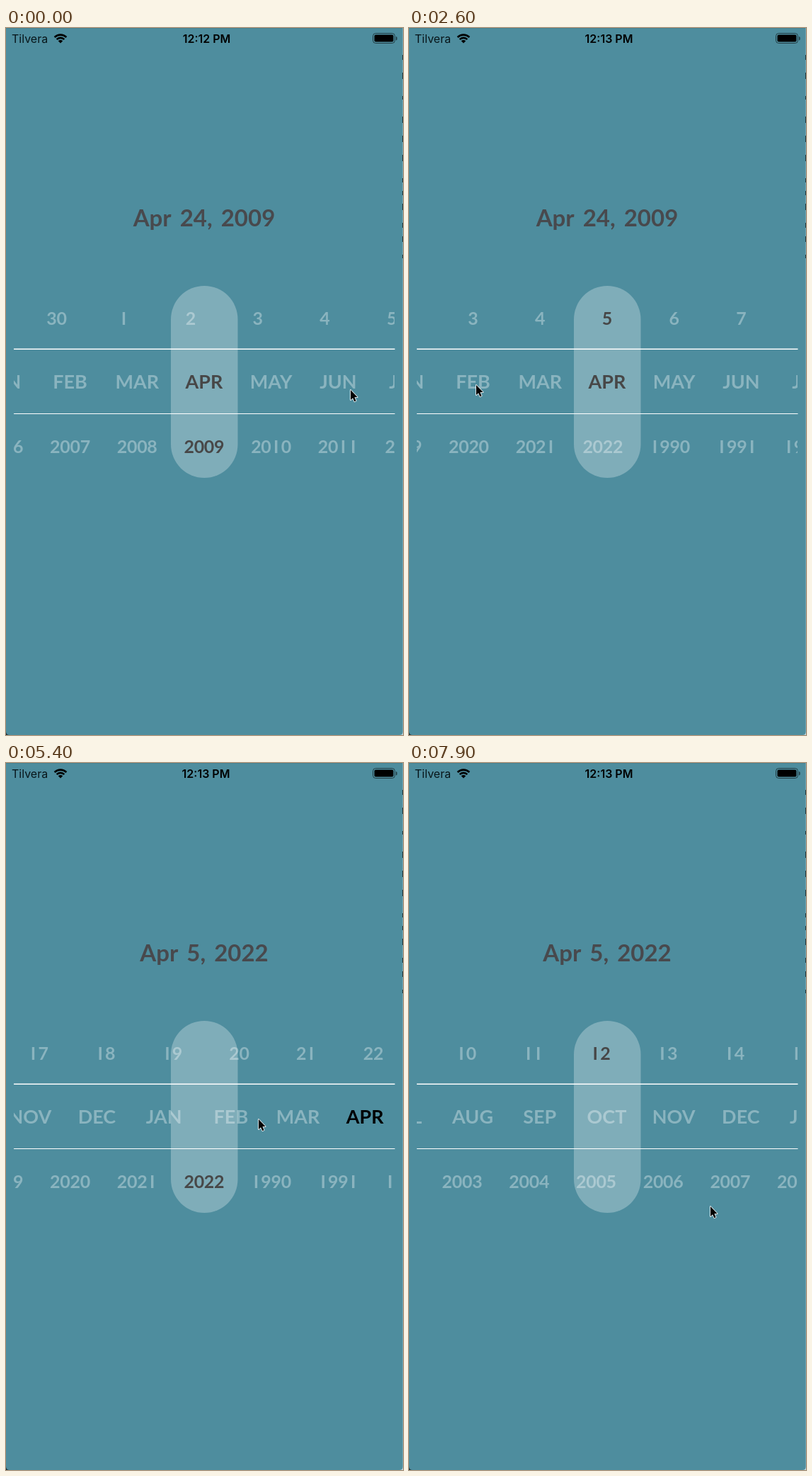
An HTML page with a canvas for the animation above (8000 ms loop, 561 px wide and 998 px high).

```html
<!DOCTYPE html>
<html lang="en">
<head>
<meta charset="utf-8">
<title>Date picker</title>
<style>
html, body { margin: 0; width: 100%; height: 100%; overflow: hidden; background: #4e8d9e; }
canvas { display: block; }
</style>
</head>
<body>
<canvas id="stage" width="561" height="998"></canvas>
<script>
const ctx = document.getElementById('stage').getContext('2d');
const LOOP = 8000, STEP = 100, MID = 280, PITCH = 94.7, DIGIT = 14.2;
const GLIDE = 0.5, SNAP = 0.35;
const MONTHS = 'JAN FEB MAR APR MAY JUN JUL AUG SEP OCT NOV DEC'.split(' ');
const UI = 'Inter, "Liberation Sans", sans-serif';
const FACE = 'Lato, "Open Sans", sans-serif';

const clamp = v => Math.max(0, Math.min(1, v));
const ease = v => (1 - Math.cos(Math.PI * v)) / 2;
const mix = (a, b, v) => a + (b - a) * v;
const part = (t, a, b) => clamp((t - a) / (b - a));
const wrap = (i, row) => ((i - row.first) % row.count + row.count) % row.count + row.first;

// A fling drags the row to a position by time `end`, glides towards `rest`,
// then snaps to a whole cell. The pointer lets go at x, y.
const fling = (begin, end, to, rest, x, y, snap = Infinity) => ({ begin, end, to, rest, x, y, snap });

const ROWS = [
  { y: 419, first: 1, count: 30, start: 1, picked: 24, size: 25, label: String, flings: [
    fling(-0.2, 0, 2.2, 5.52, 487, 511, 2),
    fling(4.75, 4.9, 1.53, -17.54, 418, 413, 7.65)
  ] },
  { y: 509, first: 1, count: 12, start: 4, picked: 4, size: 27, label: m => MONTHS[m - 1], flings: [
    fling(0.1, 0.25, 5.71, 16.79, 325, 511, 2),
    fling(5.25, 5.4, 1.6, -14.1, 357, 503)
  ] },
  { y: 600, first: 1990, count: 33, start: 2009, picked: 2009, size: 25, label: String, flings: [
    fling(0.65, 0.9, 2011.17, 2022.44, 244, 612, 3.9),
    fling(5.8, 5.99, 2018.25, 2004.87, 426, 627)
  ] }
];

// Pointer stops [time, x, y]: the resting places, joined by the two ends of every drag.
const pointer = [[2, 88, 528], [3.2, 102, 480], [4.6, 105, 435], [7.9, 426, 626]];
for (const row of ROWS) {
  let from = row.start;
  for (const f of row.flings) {
    f.from = from;
    f.cell = Math.floor(f.rest);
    from = wrap(f.cell, row);
    pointer.push([f.begin, f.x + (f.to - f.from) * PITCH, f.y], [f.end, f.x, f.y]);
  }
}
pointer.sort((a, b) => a[0] - b[0]);

function rowState(row, t) {
  let pos = row.start, picked = row.picked;
  for (const f of row.flings) {
    if (t < f.begin) break;
    if (t <= f.end) {
      pos = mix(f.from, f.to, part(t, f.begin, f.end));
    } else {
      const glide = Math.exp((f.end - Math.min(t, f.snap)) / GLIDE);
      pos = mix(f.rest, f.to, glide);
    }
    if (t >= f.snap) {
      pos = mix(pos, f.cell, ease(clamp((t - f.snap) / SNAP)));
      picked = wrap(f.cell, row);
    }
  }
  return { pos, picked };
}

function text(str, x, y, font, color, align = 'center') {
  ctx.font = font;
  ctx.fillStyle = color;
  ctx.textAlign = align;
  ctx.fillText(str, x, y);
}

// Evenly spaced figures whose one is a plain stem.
function cell(str, x, row, color) {
  const font = `700 ${row.size}px ${FACE}`;
  if (isNaN(str)) return text(str, x, row.y, font, color);
  [...str].forEach((c, i) =>
    text(c === '1' ? 'I' : c, x + (i - (str.length - 1) / 2) * DIGIT, row.y, font, color));
}

function drawRow(row, t) {
  const { pos, picked } = rowState(row, t);
  const mid = Math.round(pos);
  for (let i = mid - 4; i <= mid + 4; i++) {
    const value = wrap(i, row);
    cell(row.label(value), MID + (i - pos) * PITCH, row,
      value === picked ? '#000' : 'rgba(255,255,255,.34)');
  }
}

function box(x, y, w, h, r, color) {
  ctx.beginPath();
  ctx.roundRect(x, y, w, h, r);
  ctx.fillStyle = color;
  ctx.fill();
}

function drawStatus(t) {
  const early = t < 1.5;
  text('Tilvera', 8, 21, `400 16px ${UI}`, '#08161a', 'left');
  text(early ? '12:12 PM' : '12:13 PM', early ? 283.5 : 282.5, 21, `600 16px ${UI}`, '#000');

  const up = -Math.PI / 2, spread = 0.78;
  ctx.strokeStyle = ctx.fillStyle = '#000';
  ctx.lineWidth = 2.6;
  for (const r of [11.9, 7.6]) {
    ctx.beginPath();
    ctx.arc(77, 21.5, r, up - spread, up + spread);
    ctx.stroke();
  }
  ctx.beginPath();
  ctx.moveTo(77, 21.5);
  ctx.arc(77, 21.5, 4.6, up - spread, up + spread);
  ctx.fill();

  ctx.beginPath();
  ctx.roundRect(518.5, 7.5, 31, 14, 4);
  ctx.lineWidth = 1;
  ctx.strokeStyle = 'rgba(0,0,0,.55)';
  ctx.stroke();
  box(520.5, 9.5, 27, 10, 2, '#000');
  box(551, 12, 1.7, 5.5, [0, 2, 2, 0], 'rgba(0,0,0,.55)');
}

function drawTitle(t) {
  const old = t < 4.4;
  ctx.globalAlpha = old ? 1 - part(t, 4.25, 4.4) : part(t, 4.4, 4.8);
  ctx.wordSpacing = '4px';
  text(old ? 'Apr 24, 2009' : 'Apr 5, 2022', MID, 280, `700 33px ${FACE}`, '#48494d');
  ctx.wordSpacing = '0px';
  ctx.globalAlpha = 1;
}

function drawPointer(t) {
  const k = Math.max(1, pointer.findIndex(p => p[0] > t));
  const [p, q] = t >= 7.9 ? [pointer.at(-1), pointer.at(-1)] : [pointer[k - 1], pointer[k]];
  const v = p === q ? 0 : part(t, p[0], q[0]);
  ctx.save();
  ctx.translate(mix(p[1], q[1], v), mix(p[2], q[2], v));
  ctx.beginPath();
  [[0, 0], [0, 14], [3.1, 11.2], [5.4, 16.2], [7.6, 15.2], [5.4, 10.3], [9.6, 10]]
    .forEach(([x, y]) => ctx.lineTo(x, y));
  ctx.closePath();
  ctx.lineJoin = 'round';
  ctx.lineWidth = 1.8;
  ctx.strokeStyle = '#e8eff1';
  ctx.stroke();
  ctx.fillStyle = '#000';
  ctx.fill();
  ctx.restore();
}

function corner(x, dir, color) {
  ctx.beginPath();
  ctx.moveTo(x, 993);
  ctx.quadraticCurveTo(x, 998, x + dir * 5, 998);
  ctx.lineTo(x, 998);
  ctx.fillStyle = color;
  ctx.fill();
}

// Slivers of the window behind show along the right side.
function drawEdges() {
  box(0, 0, 561, 1, 0, '#47808f');
  box(560, 0, 1, 998, 0, '#6fa2b0');
  for (let y = 38, seed = 7; y < 335; y += 16 + seed % 24) {
    seed = seed * 37 % 101;
    box(560, y, 1, 4 + seed % 6, 0, '#20363c');
  }
  corner(0, 1, '#1c2c31');
  corner(561, -1, '#c3d7dd');
}

function draw(t) {
  ctx.fillStyle = '#4e8d9e';
  ctx.fillRect(0, 0, 561, 998);
  drawEdges();
  drawStatus(t);
  drawTitle(t);
  ctx.save();
  ctx.beginPath();
  ctx.rect(11, 380, 538, 260);
  ctx.clip();
  ROWS.forEach(row => drawRow(row, t));
  ctx.restore();
  box(233, 364, 94.5, 271, 47.2, 'rgba(255,255,255,.28)');
  box(11, 452.5, 538.5, 1.5, 0, '#fff');
  box(11, 544, 538.5, 1, 0, '#fff');
  drawPointer(t);
}

const start = performance.now();
function tick() {
  const ms = (performance.now() - start) % LOOP;
  draw(Math.floor(ms / STEP) * STEP / 1000);
  requestAnimationFrame(tick);
}
tick();
</script>
</body>
</html>
```
